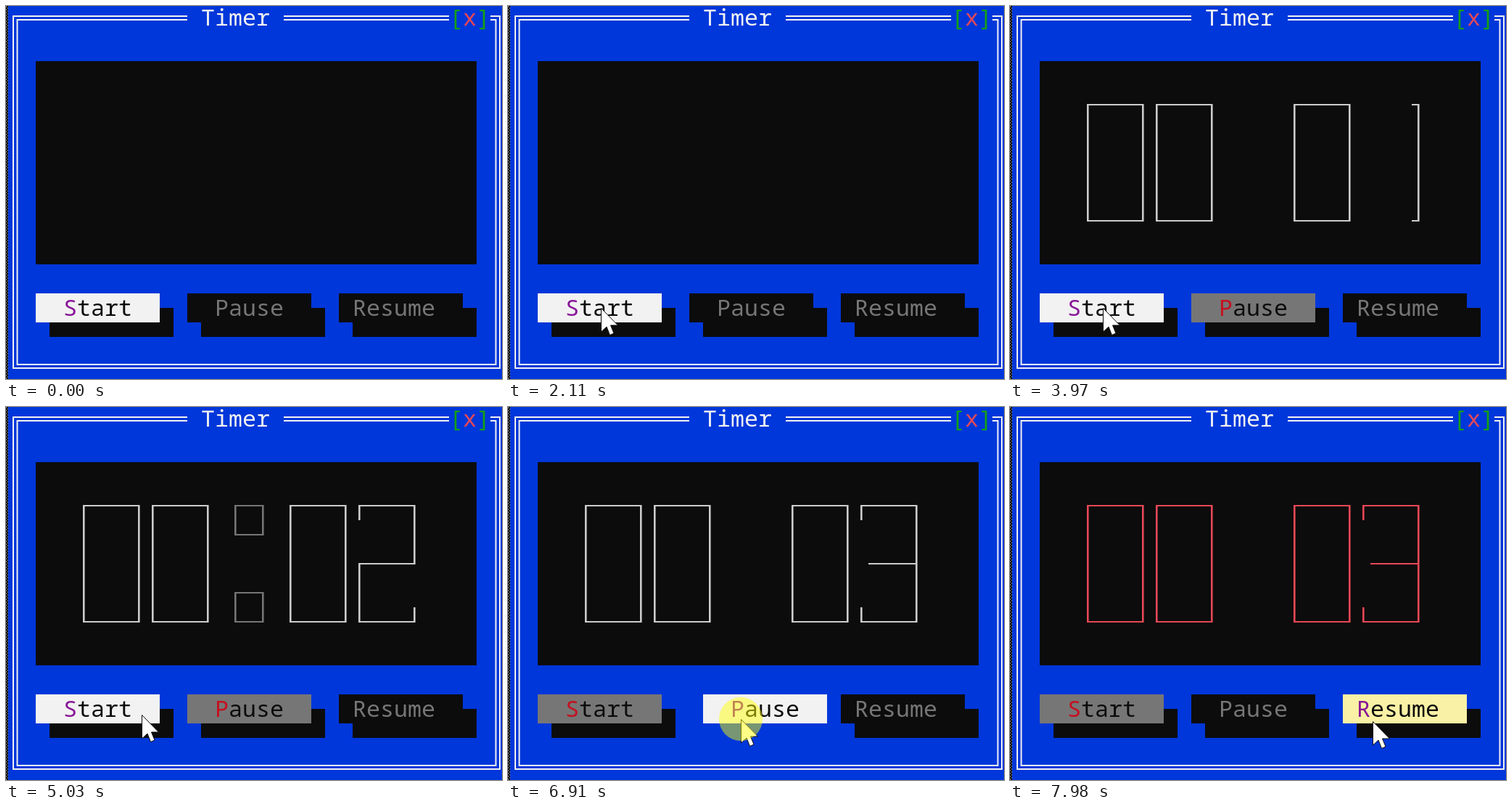
An HTML page that plays this animation: 684x514 px, repeating every 8 s.

```html
<!DOCTYPE html>
<html lang="en">
<head>
<meta charset="utf-8">
<title>Timer</title>
<style>
  html, body { margin: 0; width: 100%; height: 100%; overflow: hidden; background: #0037da; }
  svg { display: block; width: 684px; height: 514px; }
  text { font: 31.667px "Noto Sans Mono", "DejaVu Sans Mono", monospace; white-space: pre; }
</style>
</head>
<body>
<svg viewBox="0 0 684 514">
  <rect width="684" height="514" fill="#0037da"/>
  <rect width="3" height="514" fill="#0c0c0c"/>
  <path d="M.5 0V514M2.5 2V514" stroke="#767676" stroke-dasharray="2 2"/>
  <path fill="none" stroke="#f2f2f2" stroke-width="2"
    d="M250 14H10V499H681V14H668M250 19H15.500V494H675.500V19H668M383 14H611M383 19H611"/>
  <text x="269" y="27" fill="#f2f2f2">Timer</text>
  <text x="611" y="27" fill="#13a10e">[<tspan fill="#e74856">x</tspan>]</text>
  <rect x="41" y="76" width="608" height="280" fill="#0c0c0c"/>
  <path id="digits"/>
  <path id="colon" fill="#767676"/>
  <g id="buttons"></g>
  <rect id="edge" x="250" y="396" width="19" height="40" fill="#767676"/>
  <g id="mouse">
    <path d="M.5 .5V33L8 26L12.500 37.500L18 35L13.500 24H23.500Z" fill="#fff" stroke="#0c0c0c"/>
    <circle id="click" r="30" fill="#ff0" fill-opacity=".47"/>
  </g>
</svg>
<script>
const LOOP = 8000, STEP = 70, CELL = 19;
const TOP = 135, MID = 215, END = 295;
const $ = id => document.getElementById(id);

// Button looks: [background, text, hot key]
const LOOKS = {
  off: ['#0c0c0c', '#767676', '#767676'],
  on: ['#767676', '#0c0c0c', '#c50f1f'],
  focus: ['#f2f2f2', '#0c0c0c', '#881798'],
  hover: ['#f9f1a5', '#0c0c0c', '#881798']
};

// From each time on: looks of Start, Pause, Resume and the pressed button
const STATES = [
  [0, ['focus', 'off', 'off'], -1],
  [2780, ['focus', 'off', 'off'], 0],
  [2970, ['focus', 'on', 'off'], -1],
  [6910, ['on', 'focus', 'off'], 1],
  [6980, ['on', 'off', 'on'], -1]
];
const TICKS = [2970, 3970, 4970, 5990];
const CLICKS = [[2250, 2380], [2780, 2970], [6910, 6980]];

// Pointer moves: start time, then [step, x, y]
const MOVES = [
  [1560, [0, 181, 404], [2, 152, 421], [4, 136, 426], [7, 128, 416]],
  [4630, [0, 133, 417], [5, 187, 424], [9, 250, 428], [10.500, 268, 429],
    [11.500, 283, 430], [13, 304, 430], [15, 315, 430], [17, 321, 430]],
  [7560, [0, 329, 430], [2, 382, 431], [4, 448, 433], [6, 500, 433]]
];

function pointer(t) {
  const stepOf = start => Math.floor((t - start + 10) / STEP);
  const move = MOVES.filter(m => t >= m[0]).pop();
  if (!move) {
    const u = Math.min(stepOf(730) / 11, 1);
    return [196 + 382 * (1 - u) ** 1.9, 275 + 119 * u ** 1.15];
  }
  const [start, ...points] = move, k = stepOf(start);
  const next = points.findIndex(p => p[0] >= k);
  if (next < 0) return points[points.length - 1].slice(1);
  if (next === 0) return points[0].slice(1);
  const a = points[next - 1], b = points[next], u = (k - a[0]) / (b[0] - a[0]);
  return [a[1] + (b[1] - a[1]) * u, a[2] + (b[2] - a[2]) * u];
}

const box = (x, y, w, h) => `M${x} ${y}h${w}v${h}h${-w}z`;
const vert = (x, y1, y2) => box(x + 8, y1, 2.6, y2 - y1);
const horiz = (x1, x2, y) => box(x1, y, x2 - x1, 2);
const frame = (x, w, y, h) =>
  vert(x, y, y + h + 2) + vert(x + w, y, y + h + 2) +
  horiz(x + 8, x + w + 10.6, y) + horiz(x + 8, x + w + 10.6, y + h);

function digit(n, x) {
  const r = x + 4 * CELL, left = x + 8, right = r + 10.6, low = END + 2;
  if (n === 0) return frame(x, 4 * CELL, TOP, 160);
  if (n === 1) return vert(r, TOP, low) + horiz(r, right, TOP) + horiz(r, right, END);
  const shared = vert(x, TOP, 156) + horiz(left, right, TOP) + horiz(left, right, END);
  return shared + (n === 2
    ? vert(r, TOP, MID + 2) + horiz(left, right, MID) + vert(x, MID, low) + vert(r, 276, low)
    : vert(r, TOP, low) + horiz(x + CELL, right, MID) + vert(x, 276, low));
}

$('colon').setAttribute('d', frame(307, 38, TOP, 40) + frame(307, 38, 255, 40));
const zeros = [98, 193, 383].map(x => digit(0, x)).join('');
const faces = TICKS.map((_, n) => zeros + digit(n, 478));

const buttons = [['Start', 41, 79], ['Pause', 250, 288], ['Resume', 459, 478]].map(([label, x, textX]) => {
  const g = document.createElementNS('http://www.w3.org/2000/svg', 'g');
  g.innerHTML = `<rect x="${x + CELL}" y="416" width="171" height="40" fill="#0c0c0c"/>
    <g><rect x="${x}" y="396" width="171" height="40"/>
    <text x="${textX}" y="427"><tspan>${label[0]}</tspan>${label.slice(1)}</text></g>`;
  $('buttons').append(g);
  const [shadow, body] = g.children, [back, text] = body.children;
  return { x, shadow, body, back, text, hot: text.firstChild };
});

const show = (el, on) => el.setAttribute('visibility', on ? 'visible' : 'hidden');

function draw(t) {
  const [, looks, pressed] = STATES.filter(s => t >= s[0]).pop();
  const [mx, my] = pointer(t);

  buttons.forEach((b, i) => {
    const over = t >= 730 && mx >= b.x && mx < b.x + 171 && my >= 396 && my < 436;
    const [back, ink, hot] = LOOKS[looks[i] === 'on' && over ? 'hover' : looks[i]];
    b.back.setAttribute('fill', back);
    b.text.setAttribute('fill', ink);
    b.hot.setAttribute('fill', hot);
    b.body.setAttribute('transform', `translate(${pressed === i ? CELL : 0} 0)`);
    show(b.shadow, pressed !== i);
  });
  show($('edge'), pressed === 0);

  const sec = TICKS.filter(s => t >= s).length - 1;
  $('digits').setAttribute('d', faces[sec] || '');
  $('digits').setAttribute('fill', t >= 6980 ? '#e74856' : '#cccccc');
  show($('colon'), sec >= 0 && sec % 2 === 0);

  $('mouse').setAttribute('transform', `translate(${Math.round(mx)} ${Math.round(my)})`);
  $('mouse').setAttribute('display', t >= 730 ? 'inline' : 'none');
  show($('click'), CLICKS.some(([a, b]) => t >= a && t < b));
}

const start = performance.now();
function tick() {
  draw((performance.now() - start) % LOOP);
  requestAnimationFrame(tick);
}
tick();
</script>
</body>
</html>
```
